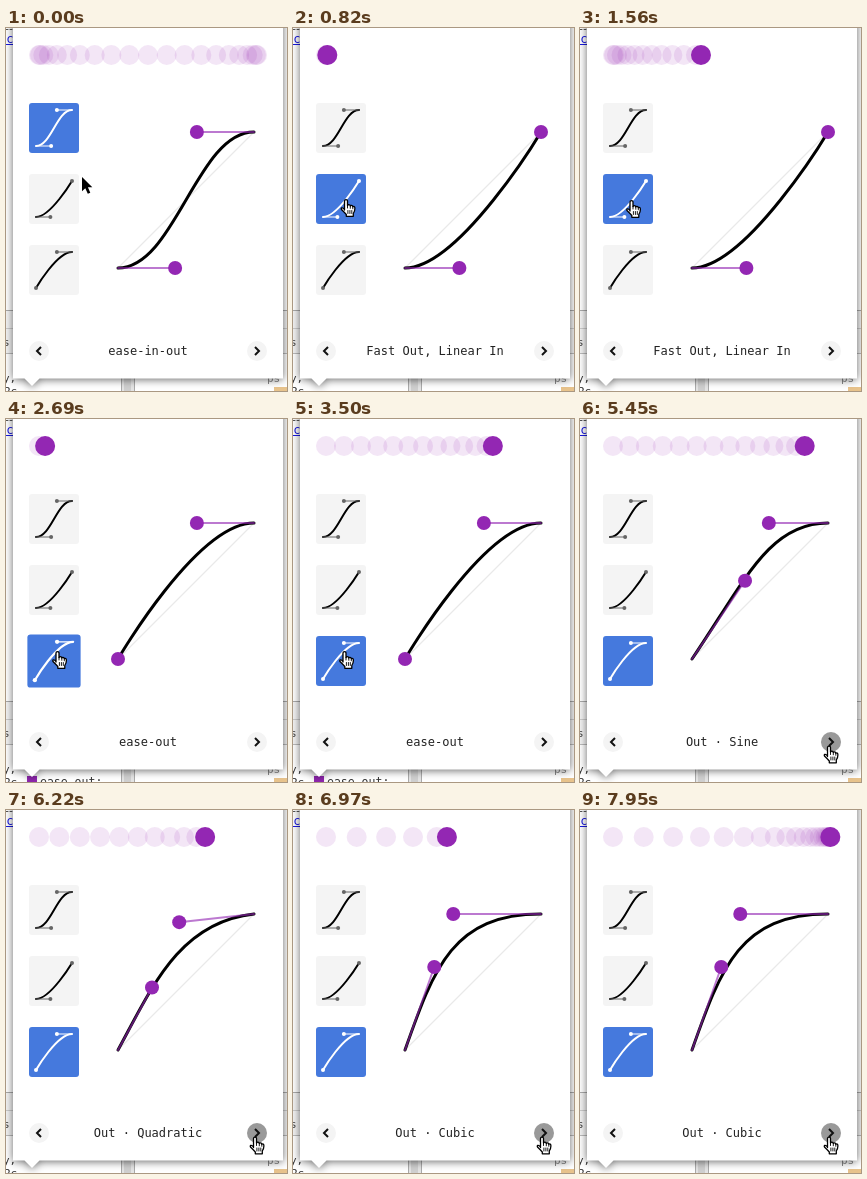
An HTML page with a canvas that plays this animation: 281x363 px, repeating every 8000 ms.

```html
<!DOCTYPE html>
<html lang="en">
<head>
<meta charset="utf-8">
<title>Easing editor</title>
<style>
html, body { margin: 0; width: 100%; height: 100%; overflow: hidden; background: #fff; }
canvas { display: block; width: 281px; height: 363px; }
</style>
</head>
<body>
<canvas id="stage"></canvas>
<script>
const W = 281, H = 363, LOOP = 8000;
const PURPLE = '#9327b3', BLUE = '#4579dd', PALE = '#f4f4f4', HOVER = '#999';
const MONO = '"DejaVu Sans Mono", monospace';
const TRAVEL = 218, RUN = 1440, FADE = 160, SLICES = 20, PRESS = 72;

const canvas = document.getElementById('stage');
const ctx = canvas.getContext('2d');
const ratio = window.devicePixelRatio || 1;
canvas.width = W * ratio;
canvas.height = H * ratio;

// Each click restarts the preview with a new curve.
const clicks = [
  { at: -2000, name: 'ease-in-out', curve: [.42, 0, .58, 1], thumb: 0 },
  { at: 740, name: 'Fast Out, Linear In', curve: [.4, 0, 1, 1], thumb: 1 },
  { at: 2667, name: 'ease-out', curve: [0, 0, .58, 1], thumb: 2, css: true },
  { at: 4518, name: 'Out · Sine', curve: [.39, .575, .565, 1], thumb: 2, next: true },
  { at: 5515, name: 'Out · Quadratic', curve: [.25, .46, .45, .94], thumb: 2, next: true },
  { at: 6648, name: 'Out · Cubic', curve: [.215, .61, .355, 1], thumb: 2, next: true }
];

const thumbs = [
  { y: 75, curve: [.42, 0, .58, 1] },
  { y: 146, curve: [.4, 0, 1, 1] },
  { y: 217, curve: [0, 0, .58, 1] }
];

// Pointer moves: start, end, from, to
const moves = [
  [350, 660, 76, 149, 53, 171],
  [1180, 1400, 53, 171, 51.5, 172],
  [1990, 2430, 51.5, 172, 51.5, 232],
  [3540, 4230, 51.5, 232, 249, 326.5]
];

const handShape = new Path2D('M4 11V2Q4 .6 5.5 .6Q7 .6 7 2V6.5Q7.2 5.6 8.4 5.6Q9.7 5.6 9.8 7Q10 6.2 11 6.3' +
  'Q12.2 6.4 12.3 7.8Q13 7.2 13.8 7.6Q14.5 8 14.4 9.5Q14.4 12 12.8 14.5V17.3H5.8V15.5Q4 13.5 1.2 10.8' +
  'Q.3 9.6 1.3 8.9Q2.4 8.4 4 10.5Z');
const handLines = new Path2D('M7 6.5V9M9.8 7V9.3M12.3 8V9.8M7.4 11.5V14.5M9.4 11.5V14.5M11.3 11.5V14.5');
const arrowShape = new Path2D('M0 0V14.2L3.3 11.2L5.8 16.8L8.3 15.7L5.9 10.3H10.3Z');

const clamp = v => Math.max(0, Math.min(1, v));
const smooth = v => v * v * (3 - 2 * v);
const cubic = (a, b, s) => 3 * a * s * (1 - s) ** 2 + 3 * b * s * s * (1 - s) + s ** 3;

function ease([x1, y1, x2, y2], x) {
  if (x <= 0) return 0;
  if (x >= 1) return 1;
  let lo = 0, hi = 1;
  for (let i = 0; i < 24; i++) {
    const mid = (lo + hi) / 2;
    if (cubic(x1, x2, mid) < x) lo = mid; else hi = mid;
  }
  return cubic(y1, y2, lo);
}

function disc(x, y, r, color) {
  ctx.fillStyle = color;
  ctx.beginPath();
  ctx.arc(x, y, r, 0, 2 * Math.PI);
  ctx.fill();
}

function line(color, width, ...pts) {
  ctx.strokeStyle = color;
  ctx.lineWidth = width;
  ctx.beginPath();
  for (let i = 0; i < pts.length; i += 2) ctx.lineTo(pts[i], pts[i + 1]);
  ctx.stroke();
}

function rect(x, y, w, h, color) {
  ctx.fillStyle = color;
  ctx.fillRect(x, y, w, h);
}

function text(str, x, y, color, size = 12, align = 'left') {
  ctx.font = size + 'px ' + MONO;
  ctx.textAlign = align;
  ctx.fillStyle = color;
  ctx.fillText(str, x, y);
}

function scaled(x, y, k, draw) {
  ctx.save();
  ctx.translate(x, y);
  ctx.scale(k, k);
  ctx.translate(-x, -y);
  draw();
  ctx.restore();
}

function page(showCss) {
  rect(0, 0, W, H, '#fff');
  ctx.setLineDash([2, 2]);
  line('#555', 1, 0, 1.5, 8, 1.5);
  ctx.setLineDash([]);
  text('uc', -7, 15, '#1a1ae0');
  line('#1a1ae0', 1, 0, 16.5, 7, 16.5);

  rect(0, 282, W, 81, '#f3f3f3');
  rect(0, 282, W, 1, '#aaa');
  rect(0, 300, W, 1, '#ccc');
  rect(0, 326, W, 37, '#fff');
  rect(0, 325, W, 1, '#bbb');
  text('s', -3, 318, '#444', 11);

  text('y,', -3, 354, '#333', 11);
  text('Rc', -2, 367, '#333', 11);
  rect(115, 340, 14, 23, '#e4e4e4');
  rect(115, 340, 1, 23, '#aaa');
  rect(128, 340, 1, 23, '#aaa');
  rect(118, 340, 7, 23, '#cfcfcf');
  text('ps', 261, 354, '#888', 11);
  rect(268, 359, 13, 4, '#e8c38c');
  if (showCss) {
    rect(21, 357, 10, 6, PURPLE);
    text('ease-out:', 34, 367, '#333', 11.5);
  }
}

function popover() {
  ctx.save();
  ctx.shadowColor = 'rgba(0,0,0,.6)';
  ctx.shadowBlur = 9 * ratio;
  ctx.shadowOffsetY = ratio;
  ctx.fillStyle = '#fff';
  ctx.beginPath();
  ctx.rect(7, -12, 270, 362.5);
  ctx.moveTo(18, 350);
  ctx.lineTo(34, 350);
  ctx.lineTo(26, 358);
  ctx.fill();
  ctx.restore();
  rect(7, 0, 270, 350, '#fff');
}

function preview(curve, age) {
  const u = age / RUN;
  ctx.globalAlpha = .115;
  for (let i = 0; i <= SLICES && i / SLICES <= u; i++) {
    disc(33 + TRAVEL * ease(curve, i / SLICES), 27, 10, PURPLE);
  }
  ctx.globalAlpha = 1 - clamp((age - RUN) / FADE);
  if (ctx.globalAlpha > 0) disc(33 + TRAVEL * ease(curve, u), 27, 10, PURPLE);
  ctx.globalAlpha = 1;
}

// Bezier in a square whose lower left corner is (x, y).
function plot(x, y, size, [x1, y1, x2, y2], style) {
  const ex = x + size, ey = y - size;
  const ax = x + x1 * size, ay = y - y1 * size;
  const bx = x + x2 * size, by = y - y2 * size;
  ctx.strokeStyle = style.curve;
  ctx.lineWidth = style.width;
  ctx.beginPath();
  ctx.moveTo(x, y);
  ctx.bezierCurveTo(ax, ay, bx, by, ex, ey);
  ctx.stroke();
  ctx.globalAlpha = style.alpha;
  line(style.handle, style.thin, x, y, ax, ay);
  line(style.handle, style.thin, ex, ey, bx, by);
  ctx.globalAlpha = 1;
  disc(ax, ay, style.dot, style.handle);
  disc(bx, by, style.dot, style.handle);
}

function drawThumb({ y, curve }, selected, hover, k) {
  scaled(48, y + 25, k, () => {
    ctx.fillStyle = selected ? BLUE : hover ? HOVER : PALE;
    ctx.beginPath();
    ctx.roundRect(23, y, 50, 50, 3);
    ctx.fill();
    plot(30, y + 43, 36, curve, {
      curve: selected ? '#fff' : '#000', width: 2,
      handle: selected ? '#fff' : '#666', thin: 1.2, alpha: 1, dot: 2
    });
  });
}

function button(x, dir, hover, k) {
  scaled(x, 323, k, () => {
    disc(x, 323, 10, hover ? HOVER : PALE);
    ctx.lineCap = 'butt';
    ctx.lineJoin = 'miter';
    line('#111', 2, x - 2 * dir, 319, x + 2 * dir, 323, x - 2 * dir, 327);
    ctx.lineCap = ctx.lineJoin = 'round';
  });
}

function pointerAt(t) {
  let p = [moves[0][2], moves[0][3]];
  for (const [a, b, x0, y0, x1, y1] of moves) {
    if (t < a) break;
    const k = smooth(clamp((t - a) / (b - a)));
    p = [x0 + (x1 - x0) * k, y0 + (y1 - y0) * k];
  }
  return p;
}

function pointer(x, y, hand) {
  ctx.save();
  if (hand) {
    ctx.translate(x - 5.5, y);
    ctx.fillStyle = '#fff';
    ctx.fill(handShape);
    ctx.strokeStyle = '#000';
    ctx.lineWidth = 1.3;
    ctx.stroke(handShape);
    ctx.lineWidth = .9;
    ctx.stroke(handLines);
  } else {
    ctx.translate(x, y);
    ctx.strokeStyle = '#fff';
    ctx.lineWidth = 2;
    ctx.stroke(arrowShape);
    ctx.fillStyle = '#000';
    ctx.fill(arrowShape);
  }
  ctx.restore();
}

// Pressed controls swell, then settle after release.
function pressScale(t, hit) {
  let k = 1;
  for (const c of clicks) {
    if (!hit(c)) continue;
    const d = t - c.at;
    if (d >= -PRESS && d < 0) k = 1 + .1 * smooth(1 + d / PRESS);
    else if (d >= 0 && d < 60) k = 1 + .1 * (1 - smooth(d / 60));
  }
  return k;
}

function render(t) {
  const now = clicks.filter(c => c.at <= t).pop();
  const [px, py] = pointerAt(t);
  const overThumb = thumbs.findIndex(({ y }) => px >= 23 && px <= 73 && py >= y && py <= y + 50);
  const overNext = Math.hypot(px - 251, py - 323) < 10;

  ctx.setTransform(ratio, 0, 0, ratio, 0, 0);
  ctx.lineCap = ctx.lineJoin = 'round';
  page(now.css);
  popover();
  preview(now.curve, t - now.at);
  thumbs.forEach((th, i) => drawThumb(th, i === now.thumb, i === overThumb,
    pressScale(t, c => !c.next && c.thumb === i)));

  line('#e9e9e9', 1.2, 112, 240, 248, 104);
  plot(112, 240, 136, now.curve, {
    curve: '#000', width: 3, handle: PURPLE, thin: 2, alpha: .62, dot: 7
  });

  button(33, -1, false, 1);
  button(251, 1, overNext, pressScale(t, c => c.next));
  text(now.name, 142, 327, '#222', 12, 'center');
  pointer(px, py, overThumb >= 0 || overNext);
}

function tick() {
  render(performance.now() % LOOP);
  requestAnimationFrame(tick);
}
tick();
</script>
</body>
</html>
```
